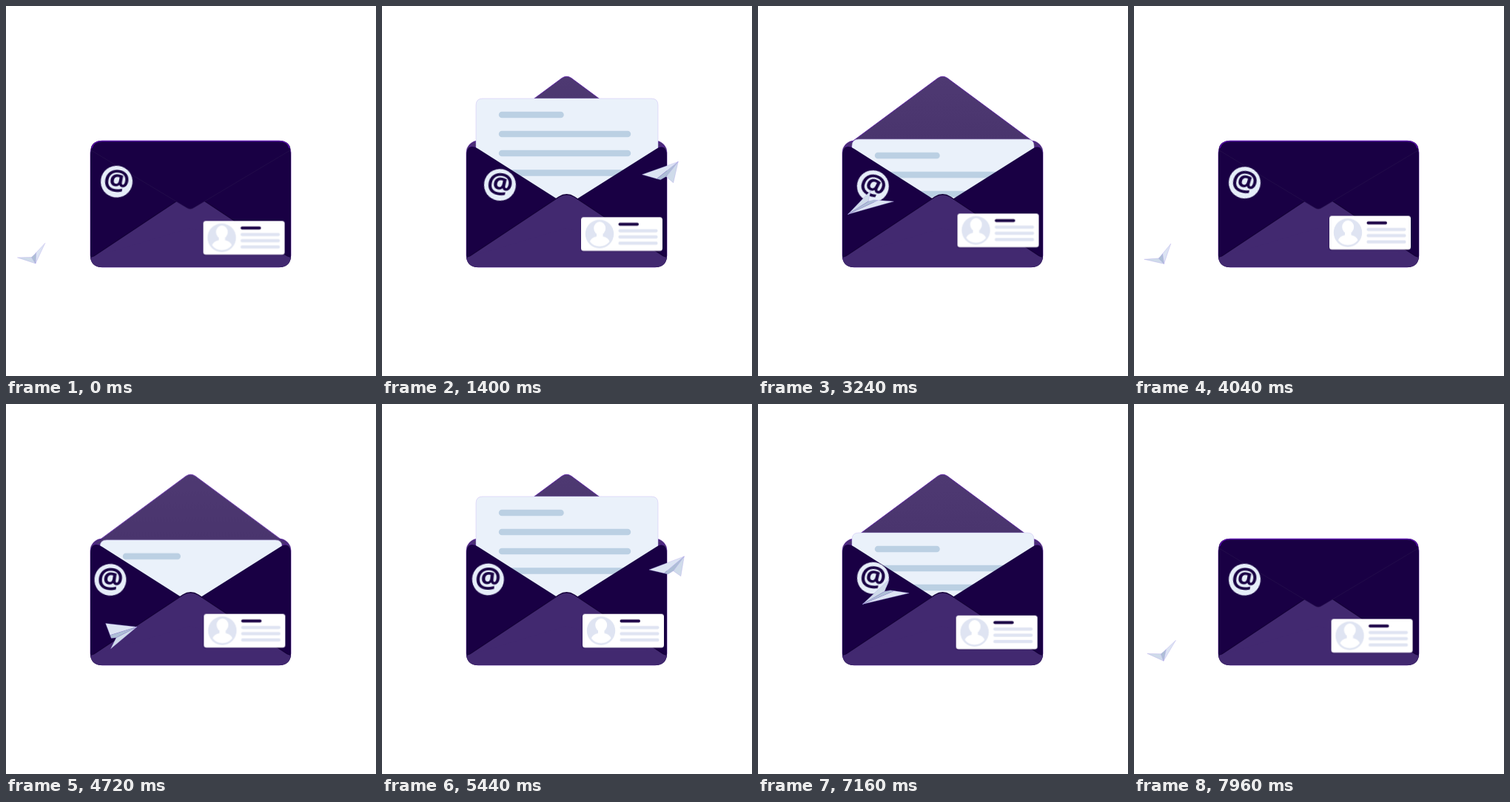
An HTML page that plays this animation: 500 px wide and 500 px high, repeating every 8000 ms.

```html
<!DOCTYPE html>
<html lang="en">
<head>
<meta charset="utf-8">
<title>Mail envelope</title>
<style>
  html, body { margin: 0; width: 100%; height: 100%; overflow: hidden; background: #fff; }
  svg { display: block; width: 100%; height: 100%; }

  .flap-open, .flap-shut { transform-origin: 249.5px 186px; animation: 4s infinite; }
  .flap-open { animation-name: open; }
  .flap-shut { animation-name: shut; }
  @keyframes open {
    0%, 10.375% { transform: scaleY(0); animation-timing-function: cubic-bezier(.333, .5, .667, 1); }
    18.25% { transform: scaleY(1); animation-timing-function: linear; }
    82.5% { transform: scaleY(1); animation-timing-function: cubic-bezier(.333, 0, .667, .5); }
    90.375%, 100% { transform: scaleY(0); }
  }
  @keyframes shut {
    0%, 2.5% { transform: scaleY(1); animation-timing-function: cubic-bezier(.333, 0, .667, .5); }
    10.375% { transform: scaleY(0); animation-timing-function: linear; }
    90.375% { transform: scaleY(0); animation-timing-function: cubic-bezier(.333, .5, .667, 1); }
    98.25%, 100% { transform: scaleY(1); }
  }

  .letter { animation: rise 4s cubic-bezier(.333, 0, .667, 1) infinite; }
  @keyframes rise {
    0%, 17.5%, 84%, 100% { transform: translateY(59px); }
    33.25%, 65% { transform: none; }
  }

  .line {
    fill: none; stroke: #bbd0e3; stroke-width: 8.5; stroke-linecap: round;
    stroke-dasharray: 1 2;
    animation: write 4s calc(var(--i) * .2s) infinite backwards;
  }
  @keyframes write {
    0%, 15%, 95.1%, 100% { stroke-dashoffset: 1.1; }
    20%, 95% { stroke-dashoffset: 0; }
  }

  .card { animation: card 8s ease-in-out infinite; }
  @keyframes card {
    0%, 100% { transform: translate(266.5px, 290.5px); }
    17.5% { transform: translate(269px, 285.4px); }
    40.5% { transform: translate(269.5px, 280.5px); }
    50.5% { transform: translate(264px, 283.6px); }
    68% { transform: translate(271px, 283.7px); }
    79% { transform: translate(268.7px, 281px); }
  }

  .badge { animation: badge 8s ease-in-out infinite; }
  @keyframes badge {
    0%, 100% { transform: translate(149.5px, 237.3px) rotate(8deg); }
    17.5% { transform: translate(159.4px, 241.7px) rotate(10deg); }
    40.5% { transform: translate(155.3px, 243.5px) rotate(24deg); }
    50.5% { transform: translate(149.5px, 238.7px) rotate(14deg); }
    64.5% { transform: translate(137px, 237px) rotate(2deg); }
    68% { transform: translate(143.3px, 237px) rotate(3deg); }
    79% { transform: translate(161.4px, 233px) rotate(13deg); }
  }
  .badge text { font: 700 39px "Open Sans", sans-serif; fill: #190044; text-anchor: middle; }
</style>
</head>
<body>
<svg viewBox="0 0 500 500">
  <defs>
    <linearGradient id="inside" x1="0" y1="0" x2="0" y2="1">
      <stop offset="0" stop-color="#4e3972"/>
      <stop offset="1" stop-color="#49346d"/>
    </linearGradient>
  </defs>

  <rect x="114" y="182" width="271" height="171" rx="16" fill="#48326d" stroke="#5a18a8" stroke-width=".6"/>
  <path class="flap-open" fill="url(#inside)" stroke="#5a18a8" stroke-width=".8"
    d="M118 190 L243 97.500 Q249.500 93 256 97.500 L381 190 Z"/>

  <g class="letter">
    <path fill="#eaf1fa" stroke="#cbbcf4" stroke-width=".5"
      d="M127 290 V134 Q127 125 136 125 H364 Q373 125 373 134 V290 Z"/>
    <path class="line" style="--i:0" pathLength="1" d="M162 147 H241.500"/>
    <path class="line" style="--i:1" pathLength="1" d="M162 173 H332"/>
    <path class="line" style="--i:2" pathLength="1" d="M162 199 H332"/>
    <path class="line" style="--i:3" pathLength="1" d="M162 225.500 H332"/>
    <path class="line" style="--i:4" pathLength="1" d="M162 251.500 H332"/>
  </g>

  <path fill="#190044" d="M114 203 Q114 190 122 190 Q126 190 130 193 L237 261 H263
    L370 193.500 Q374 190.500 377 190.500 Q385 190.500 385 203 V337 Q385 353 369 353 H130 Q114 353 114 337 Z"/>
  <path fill="#422970" stroke="#150039" stroke-width="1.400"
    d="M114 341 L239 258 Q249.500 251.500 260 258 L385 341"/>
  <path fill="#422970" d="M114 340 L249 300 L385 340 Q383 353 369 353 H130 Q116 353 114 340 Z"/>

  <g class="flap-shut">
    <path fill="#190044" stroke="#2a1550" stroke-width=".6"
      d="M115 195 Q114.500 182.500 130 182.500 H369 Q384.500 182.500 384 195 L254 272.500 Q249 276 244 272.500 Z"/>
    <path fill="none" stroke="#5a0cac" stroke-width="1.300"
      d="M116 192 Q118 182.700 130 182.700 H369 Q381 182.700 383 192"/>
  </g>

  <g class="badge">
    <circle r="21.500" fill="#e6eef9"/>
    <text y="12.300">@</text>
  </g>

  <g class="card">
    <rect x="-1" y="1" width="112" height="46" rx="4" fill="#190044" opacity=".25"/>
    <rect width="110" height="45.500" rx="3.500" fill="#fff"/>
    <circle cx="25" cy="22.700" r="19.200" fill="#dfe4f2"/>
    <ellipse cx="25.200" cy="15" rx="8" ry="9" fill="#fff"/>
    <path fill="#fff" d="M21 21 H29.500 V26 Q37 27.500 38.500 33 Q33 39.500 25 39.500 Q17 39.500 12 33 Q13.500 27.500 21 26 Z"/>
    <g fill="none" stroke="#dfe4f2" stroke-width="4.200" stroke-linecap="round">
      <path stroke="#190044" stroke-width="4" d="M52.500 9.500 H76"/>
      <path d="M52.500 18.300 H101.500 M52.500 26.700 H101.500 M52.500 35.200 H101.500"/>
    </g>
  </g>

  <g stroke="#a394e6" stroke-width=".5" stroke-opacity=".6" stroke-linejoin="round">
    <path id="farWing" fill="#dce4f3"/>
    <path id="nearWing" fill="#cfdbea"/>
    <path id="keel" fill="#aebfd6"/>
  </g>
</svg>
<script>
  const PERIOD = 4000, LEFT_TURN = 100;

  // Sum of harmonics: each pair holds the cosine and sine amplitude
  const wave = (angle, mean, ...pairs) => pairs.reduce((sum, [c, s], i) =>
    sum + c * Math.cos((i + 1) * angle) + s * Math.sin((i + 1) * angle), mean);

  const add = (p, q) => [p[0] + q[0], p[1] + q[1]];
  const mix = (p, q, k) => [p[0] + (q[0] - p[0]) * k, p[1] + (q[1] - p[1]) * k];
  const draw = (id, ...pts) =>
    document.getElementById(id).setAttribute('d', 'M' + pts.map(p => p.join(' ')).join('L') + 'Z');

  // The plane circles on a tilted orbit, so its corners turn with the orbit angle
  function render(t) {
    const a = (t - LEFT_TURN) / PERIOD * 2 * Math.PI;
    const centre = [wave(a, 242, [-208, 42], [0, -8], [0, -8]), wave(a, 255.5, [83, 9])];
    const toNose = [wave(a, -2.3, [8.6, 29.2], [2.3, 0]), wave(a, 2.1, [5.6, -15.4], [2, 0])];
    const toLeft = [wave(a, .5, [12, -28.5]), wave(a, -1.3, [-15.2, -3.9])];
    const toRight = [-toNose[0] - toLeft[0], -toNose[1] - toLeft[1]];
    const toKeel = [wave(a, 1.3, [-4.5, -7.5], [3.6, 0]), wave(a, 3.2, [-1.7, 5.8])];

    const [nose, left, right, keel] = [toNose, toLeft, toRight, toKeel].map(p => add(centre, p));
    const inLeft = mix(keel, left, .2);
    const inRight = mix(mix(keel, right, .2), nose, .2);
    draw('farWing', nose, left, inLeft);
    draw('nearWing', nose, right, inRight);
    draw('keel', nose, inLeft, keel, inRight);
  }

  const start = performance.now();
  function tick() {
    render((performance.now() - start) % PERIOD);
    requestAnimationFrame(tick);
  }
  tick();
</script>
</body>
</html>
```
